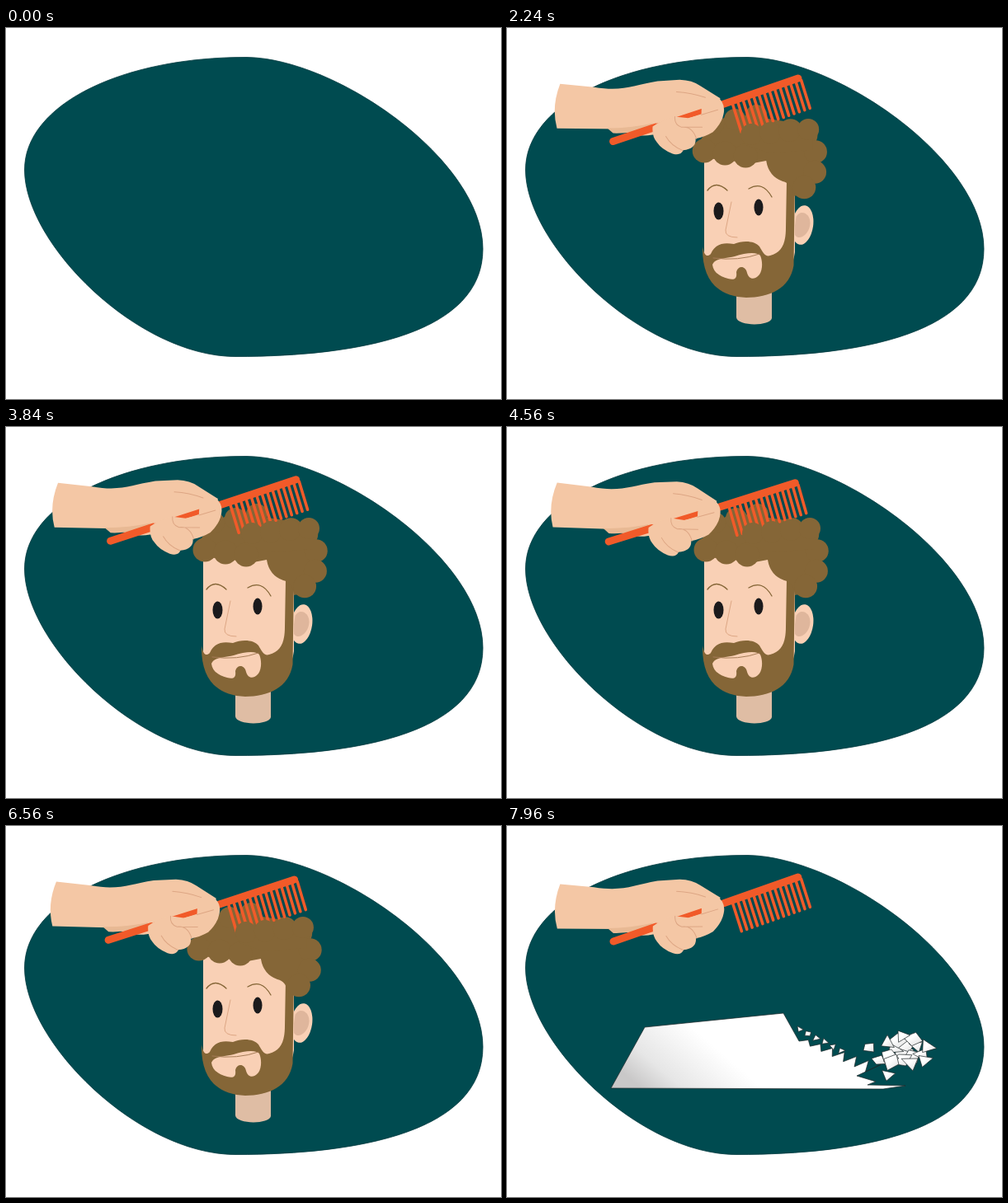
These frames come from a looping animation (600x450 px, 8 s). An HTML page:

```html
<!DOCTYPE html>
<html lang="en">
<head>
<meta charset="utf-8">
<title>Combing</title>
<style>
  html, body { margin: 0; width: 100%; height: 100%; overflow: hidden; background: #fff; }
  svg { display: block; width: 600px; height: 450px; }
  .hair { fill: #856637; }
  .skin { fill: #f9d0b5; }
  .palm { fill: #f4c7a5; }
  .line { fill: none; stroke-linecap: round; stroke-linejoin: round; }
  .crease { stroke: #dda684; stroke-width: 1; }
  .brow { stroke: #856637; stroke-width: 1.3; }
  .comb { stroke: #f15a29; stroke-linecap: round; fill: none; }
</style>
</head>
<body>
<svg viewBox="0 0 600 450">
  <defs>
    <linearGradient id="sheet" x1="0" y1=".65" x2="1" y2=".35">
      <stop offset="0" stop-color="#c9c8c8"/>
      <stop offset=".13" stop-color="#e6e6e6"/>
      <stop offset=".38" stop-color="#fff"/>
    </linearGradient>
    <linearGradient id="scrap" x1="0" y1="0" x2="1" y2="1">
      <stop offset=".4" stop-color="#fff"/>
      <stop offset="1" stop-color="#ddd"/>
    </linearGradient>
  </defs>

  <path fill="#004b50" stroke="#053b40" stroke-width=".8" d="M292 35.5C400 37 578 160 578 268C578 370 430 398.500 278 398.500C160 398.500 22.500 262 22.500 172C22.500 92 142 35 292 35.500Z"/>

  <g id="paper" stroke="#1d2627" stroke-width=".7" stroke-linejoin="round">
    <path id="page" fill="url(#sheet)"/>
    <g id="scraps" fill="url(#scrap)"></g>
  </g>

  <g id="head">
    <path fill="#dfbda4" d="M278 310H321V352C319 362 279 362 278 351Z"/>
    <g transform="rotate(8 358 240)">
      <ellipse class="skin" cx="358" cy="239" rx="13" ry="24"/>
      <path fill="#dfb69c" d="M349 230C353 219 368 224 367 239C366 253 353 260 349 249Z"/>
    </g>
    <path class="skin" d="M239 150H349V272C344 305 322 321 292 321C260 321 239 300 239 275Z"/>
    <path class="hair" d="M339 185H349L347.500 288C343 316 318 327 290 327C256 326 236 306 237 265C239 277 243 278 247 274C253 261 263 260 275 262C286 257 301 258 306 265C310 272 313 278 319 276C333 272 338 262 338 242Z"/>
    <path class="skin" d="M249 287C252 279 263 280 276 277C289 273 302 271 307 276C310 283 310 293 306 299C299 307 293 304 291 297C289 288 280 288 278 296C279 304 276 306 268 304C258 302 250 296 249 287Z"/>
    <path class="line" stroke="#a67c57" stroke-width="1" d="M250 279Q281 283 306 274"/>
    <path class="line crease" d="M272 211L265 245Q264 254 279 254"/>
    <path class="line brow" d="M243 197Q253 184 267 197M293 195Q310 185 321 205"/>
    <ellipse cx="256.500" cy="222" rx="6" ry="10.500" fill="#1b1a1c"/>
    <ellipse cx="305" cy="217.500" rx="5.500" ry="10" fill="#1b1a1c"/>
    <g id="hairBack" class="hair">
      <path d="M232 142L246 122L272 104L305 108L350 115L374 135L376 175L358 202L349 204Q347 188 336 186Q319 180 316 161L300 164L245 158Z"/>
    </g>
  </g>

  <g id="hand">
    <path class="palm" d="M64 68L105 72C140 78 152 70 182 65L209 63.500Q224 64 234 71L258 86L250 115L205 128L176 130Q155 134 135 123L60 122Q53 96 64 68Z"/>
    <path fill="#e8b994" d="M121 122Q150 122 176 116L174 119Q152 129 128 128Z"/>
    <path class="comb" stroke-width="9" d="M128 138L180 120.500"/>
    <path class="comb" stroke-width="6" d="M180 120L265 92"/>
    <path class="comb" stroke-width="9" d="M262 93L352.500 62"/>
    <g id="teeth" class="comb" stroke-width="3.600"></g>
    <path class="palm" d="M176 120Q188 111 203 108L219 110L235 106L236 82L254 84Q265 92 262 105Q260 116 249 127Q239 133 228 135Q229 147 213 149Q210 156 200 153Q187 148 181 139Q175 132 176 120Z"/>
    <path class="line crease" d="M205 78Q223 79 240 85M203 108Q202 118 211 121Q224 119 229 135M211 121L236 121M192 132Q198 143 212 149M235 106L255 100"/>
  </g>

  <g id="headFront"><g id="hairFront" class="hair">
    <path d="M287 132L300 126L372 128V148L320 152L290 142Z"/>
  </g></g>
</svg>

<script>
const LOOP = 8000, FRAME = 40;
const NS = "http://www.w3.org/2000/svg";
const $ = id => document.getElementById(id);

function add(parent, tag, attrs) {
  const el = document.createElementNS(NS, tag);
  for (const k in attrs) el.setAttribute(k, attrs[k]);
  $(parent).append(el);
}

// Curls in a row, and curls round the back of the head
function curlRow(parent, count, x, y, dx, dy, r) {
  for (let i = 0; i < count; i++)
    add(parent, "circle", { cx: x + i * dx, cy: y + i * dy, r });
}
curlRow("hairBack", 3, 252, 116, 26, -5, 13);
curlRow("hairBack", 3, 241, 149, 25, 3, 14.5);
curlRow("hairFront", 4, 298, 129, 23, -2, 13);
for (let i = 0; i < 5; i++) {
  const a = (-95 + i * 39) * Math.PI / 180;
  add("hairBack", "circle", { cx: 348 + 29 * Math.cos(a), cy: 161 + 37 * Math.sin(a), r: 14 });
}

for (let i = 0; i < 14; i++)
  add("teeth", "path", { d: `M${273 + i * 6.4} ${93 - i * 2.2}l10.500 34` });

let seed = 11;
const random = () => (seed = seed * 16807 % 2147483647) / 2147483647;

function shard(x, y, size) {
  const turn = random() * 6.28, corners = 3 + Math.round(random());
  const points = Array.from({ length: corners }, (_, k) => {
    const a = turn + k * 6.28 / corners, r = size * (.7 + random() * .6);
    return [x + r * Math.cos(a), y + r * .8 * Math.sin(a)].join();
  });
  add("scraps", "polygon", { points: points.join(" ") });
}

// Torn edge: a zigzag growing rougher towards the bottom
let tear = "";
for (let i = 0; i < 14; i++) {
  const jag = (i % 2 ? -1 : 1) * (2 + i * .3);
  tear += `L${356 + i * 7 - jag} ${259 + i * 2.8 + jag}`;
}
$("page").setAttribute("d", `M167 244L335 227${tear}L424 303L447 310L437 314L483 315L456 319L126 318Z`);

for (let i = 0; i < 6; i++) shard(355 + i * 10, 247 + i * 5, 5);
for (let i = 0; i < 3; i++) shard(438 + i * 12, 268 + i * 17, 8);
for (let i = 0; i < 17; i++) {
  const a = i * 2.4, r = Math.sqrt(i / 17);
  shard(483 + 31 * r * Math.cos(a), 272 + 19 * r * Math.sin(a), 11);
}

// Poses: hand x, hand y, hand turn, hair x
const OUT = [-375, 0, -1.7, -9];
const REST = [-15, 0, -1.7, -9];
const LIFT = [-28, -3, -4.5, -9];
const DIG = [-5, 1, 1.3, 0];
const PULL = [0, 0, 0, 0];
const RELEASE = [3, -2, -.8, -9];
const BACK = [-15, 4, 3.1, -4];
const SHOW = [1, 2, -.5, -9];

const START = 1720, END = 6720, STROKES = 6;
const period = (END - START) / STROKES;

const poses = [[840, OUT], [1200, RELEASE], [1240, REST], [START, REST]];
for (let n = 0; n < STROKES; n++)
  [[.1, LIFT], [.4, DIG], [.6, PULL], [.72, RELEASE], [.95, BACK]].forEach(
    ([part, pose]) => poses.push([START + (n + part) * period, pose]));
poses.push([END, REST], [7440, REST], [7640, LIFT], [7840, SHOW], [LOOP, SHOW]);

const progress = (t, from, to) => Math.min(1, Math.max(0, (t - from) / (to - from)));
const easeOut = p => 1 - (1 - p) ** 3;
const easeInOut = p => p * p * (3 - 2 * p);

function poseAt(t) {
  const i = Math.max(1, poses.findIndex(([at]) => at > t));
  const [t0, a] = poses[i - 1], [t1, b] = poses[i];
  const p = progress(t, t0, t1);
  return a.map((v, k) => v + (b[k] - v) * p);
}

const move = (id, x, y = 0) => $(id).setAttribute("transform", `translate(${x} ${y})`);

function draw(t) {
  const [x, y, turn, hair] = poseAt(t);
  $("hand").setAttribute("transform", `translate(${x} ${y}) rotate(${turn} 128 138)`);

  const away = 1 - easeOut(progress(t, 280, 1000));
  const headX = 170 * away - 404 * easeInOut(progress(t, 7240, 7640));
  for (const id of ["head", "headFront"]) move(id, headX, 370 * away);
  for (const id of ["hairBack", "hairFront"]) move(id, hair);
  $("headFront").style.display = t < 6920 ? "" : "none";

  move("paper", 480 * (1 - easeInOut(progress(t, 7440, 7880))));
}

const began = performance.now();
function tick(now) {
  const t = Math.max(0, now - began) % LOOP;
  draw(Math.floor(t / FRAME) * FRAME);
  requestAnimationFrame(tick);
}
draw(0);
requestAnimationFrame(tick);
</script>
</body>
</html>
```
